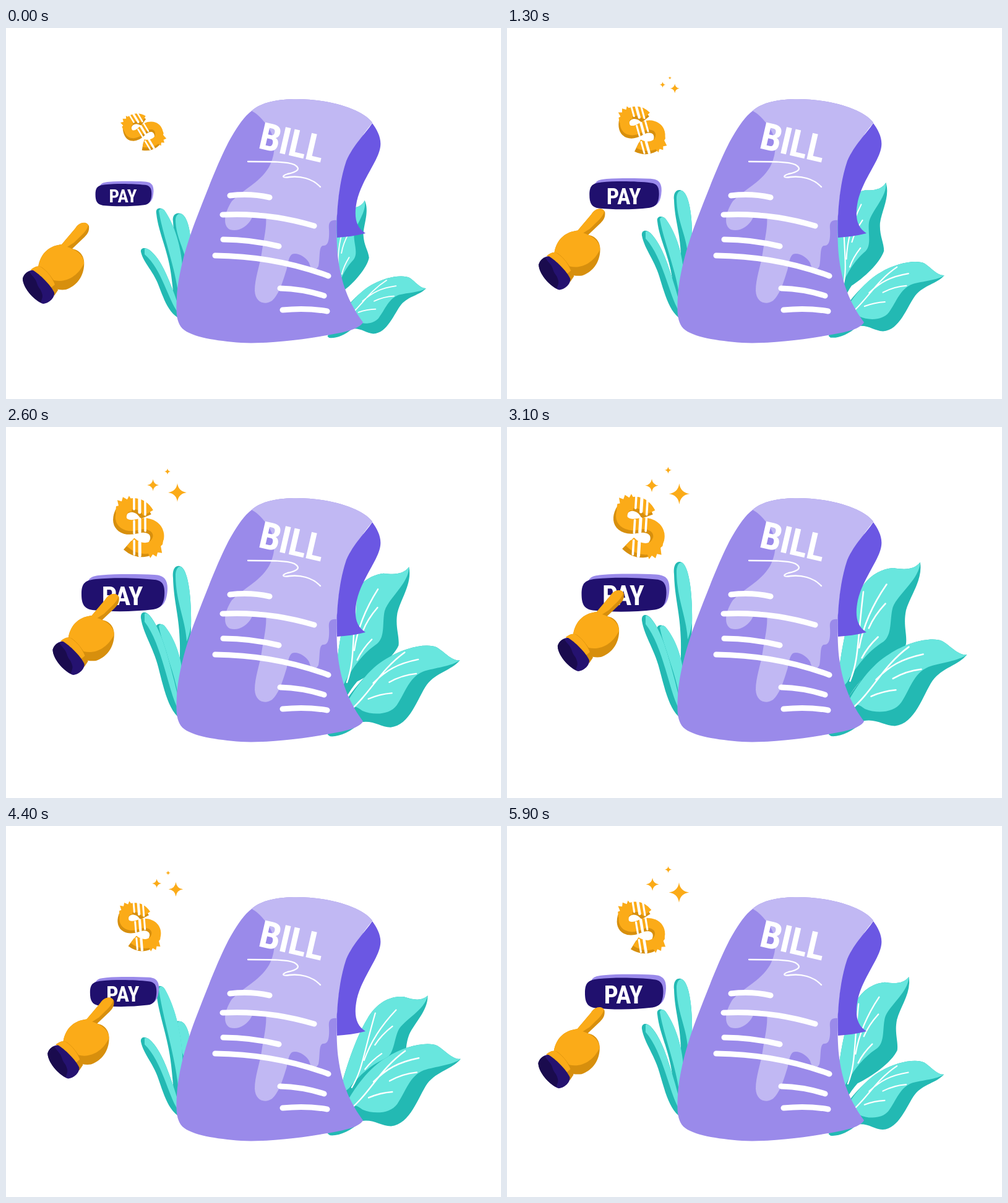
Recreate the animation shown at these times as an HTML page. Size 800 px wide and 600 px high, loop 6 s.

```html
<!DOCTYPE html>
<html lang="en">
<head>
<meta charset="utf-8">
<title>Pay the bill</title>
<style>
html, body { margin: 0; width: 100%; height: 100%; overflow: hidden; background: #fff; }
svg { display: block; width: 100vw; height: 100vh; }
text { font: 700 43px "Roboto Condensed", "Open Sans Condensed", Roboto, "Open Sans", sans-serif; font-stretch: 75%; fill: #fff; }
.light { fill: #68e6de; }
.dark { fill: #23b9b3; }
.gold { fill: #fbab18; }
.amber { fill: #d78f0d; }
.line { fill: none; stroke: #fff; stroke-linecap: round; stroke-linejoin: round; }
</style>
</head>
<body>
<svg viewBox="0 0 800 600">
  <g id="bladeA">
    <path class="dark" d="M270 265C268 250 276 244 284 249C296 258 300 300 299 340C296 400 285 440 278 470C276 440 282 400 281 360C280 320 271 300 270 265Z"/>
    <path class="light" d="M274 260C275 249 281 246 285 250C296 260 300 300 299 335C297 345 295 352 292 358C290 325 274 300 274 260Z"/>
  </g>
  <g id="bladeB">
    <path class="dark" d="M243 300C241 291 250 289 256 295C270 315 284 350 286 400C286 430 281 450 279 470C272 455 271 430 267 400C262 360 246 330 243 300Z"/>
    <path class="light" d="M247 296C249 290 254 292 257 296C271 317 285 352 286 402C286 425 283 440 280 450C279 400 254 340 247 296Z"/>
  </g>
  <g id="bladeC">
    <path class="dark" d="M218 362C217 355 225 354 232 359C252 375 262 405 272 430L279 450L277 468C262 458 255 438 248 420C240 395 222 380 218 362Z"/>
    <path class="light" d="M224 357C228 356 231 358 234 361C252 376 262 405 272 430L279 450L278 460C262 440 252 390 224 366Z"/>
  </g>

  <g id="upperLeaf">
    <path class="dark" d="M530 470C535 400 550 320 570 275C585 240 610 225 635 224C655 228 670 228 680 216C684 245 662 270 654 295C648 320 655 335 652 352C640 375 600 400 575 410C560 425 545 450 530 470Z"/>
    <path class="light" d="M535 430C538 390 550 320 570 275C585 240 610 225 635 224C655 228 670 228 680 216C678 245 640 268 632 290C626 310 630 335 615 346C595 358 575 375 552 412Z"/>
    <path class="line" stroke-width="2.6" d="M557 410C573 375 571 345 584 262M574 355C582 318 600 282 623 251M591 323Q601 302 620 283M578 372Q588 354 606 338"/>
  </g>
  <g id="lowerLeaf">
    <path class="dark" d="M520 497C540 440 590 380 620 362C650 342 690 332 708 340C722 348 735 364 749 362C735 380 708 384 692 406C676 430 664 478 630 482C612 482 600 470 578 474C560 492 540 501 524 500Z"/>
    <path class="light" d="M545 455C565 415 590 380 620 362C650 342 690 332 708 340C722 348 735 364 749 362C735 373 705 376 685 383C660 394 655 420 640 443C628 460 600 462 580 454C572 449 567 444 560 450Z"/>
    <path class="line" stroke-width="2.6" d="M558 454C592 425 609 382 652 350M598 405C620 382 640 370 676 362M626 403Q648 390 673 387M590 433Q610 424 631 422"/>
  </g>

  <path fill="#9a8aea" d="M397 134C412 120 440 115 470 115C520 115 575 130 592 153C565 185 545 225 538 270C534 300 533 345 537 375C543 420 558 450 577 476C572 485 555 490 540 493C480 505 420 511 380 509C340 506 300 500 285 486C274 474 275 455 276 435C278 400 290 355 305 315C330 250 350 200 365 175C375 158 385 143 397 134Z"/>
  <path fill="#c1b8f3" d="M397 134C412 120 440 115 470 115C520 115 575 130 592 153C565 185 545 225 538 270L534 311C524 310 521 315 522 325C523 345 520 352 513 352C505 352 508 370 505 385C500 395 492 390 490 380C485 370 470 362 462 366C455 372 456 385 452 395C446 415 440 432 430 441C418 449 403 444 402 425C402 405 410 385 413 365C416 345 422 320 420 305C415 295 400 298 397 308C390 322 375 330 362 326C350 320 352 300 365 280C385 260 410 250 425 225C438 200 436 175 420 155C412 145 405 138 397 134Z"/>
  <path fill="#6b57e3" d="M592 154C600 165 607 178 605 192C602 215 575 245 567 280C562 305 565 322 581 332C565 336 550 338 535 339C533 300 538 250 550 215C562 188 580 172 592 154Z"/>
  <text transform="translate(406 194) rotate(13)" style="font-size:61px;letter-spacing:-1px">BILL</text>
  <path class="line" stroke-width="2.3" d="M391 216C430 216 455 216 466 221C478 228 470 233 455 236C445 239 446 243 458 241C475 239 495 243 508 257"/>
  <path class="line" stroke-width="9" d="M362 271Q395 267 426 274M350 302Q425 298 498 320M351 342Q395 342 441 353M338 368Q435 369 521 401M443 421Q480 422 514 433M447 456Q485 452 519 458"/>

  <g id="sparkles" class="gold"></g>

  <g id="dollar">
    <g id="coinShape" fill="none" stroke="#d78f0d" stroke-width="19">
      <path d="M226 145C218 126 196 122 185 139C176 161 193 167 210 163C230 157 246 167 242 184C236 205 212 205 196 191"/>
    </g>
    <path class="gold" d="M177 138L178 128L182 127L180 118L187 120L189 113L196 117L199 111L204 119L203 137Z"/>
    <path class="gold" d="M254 182L253 190L250 193L252 204L245 203L243 210L237 206L233 212L229 203L236 186Z"/>
    <path fill="none" stroke="#fbab18" stroke-width="18" d="M230 139C220 121 198 118 188 136C180 155 195 162 212 158C232 152 249 163 246 180C240 201 216 200 201 186"/>
    <path class="line" stroke-linecap="butt" stroke-width="3.5" d="M207 112V133M225 114V142M207 152V172M225 148V168M207 184V206"/>
    <path class="line" stroke-linecap="butt" stroke-width="5" d="M216 112V138M216 149V170M216 186V208"/>
  </g>

  <g id="button">
    <path fill="#9a8aea" d="M130 262C131 243 138 241 155 239.500C180 237.500 215 238 240 239C255 240 261 246 261 262C260 282 254 292 240 293L150 290Z"/>
    <path fill="#20106e" d="M122 270C122 252 128 248 145 246C175 243 215 244 240 247C253 248 257 256 256 272C255 286 251 293 238 295C205 299 170 299 140 296C126 294 122 286 122 270Z"/>
    <text x="188" y="288" text-anchor="middle">PAY</text>
  </g>

  <g id="hand">
    <path class="amber" d="M52 387C56 362 72 352 90 350L112 324C118 314 130 312 134 320C135 328 132 333 127 338L107 357C122 360 128 372 126 386C124 405 112 418 97 423C90 424 82 423 78 421Z"/>
    <path class="gold" d="M52 387C56 362 72 352 90 350L112 324C118 314 130 312 133 319C131 328 122 335 110 347L99 354C116 359 127 370 126 381C117 400 98 413 77 408Z"/>
    <path class="amber" d="M40 391C46 386 52 384 58 387C70 396 80 410 84 424L78 433C72 415 52 396 40 391Z"/>
    <path class="gold" d="M40 391C46 386 52 384 57 387C67 394 75 404 79 415L73 420C64 407 52 396 40 391Z"/>
    <path fill="#251270" d="M27 405C30 396 38 391 44 392C54 398 72 415 78 428C79 436 70 445 60 446C48 443 27 420 27 405Z"/>
    <path fill="#1a0b4e" d="M27 405C29 398 34 394 38 394C41 401 48 404 50 413C53 422 56 421 58 429C61 436 56 440 57 444C44 439 27 420 27 405Z"/>
  </g>
</svg>
<script>
const LOOP = 6000, STEP = 100;
const el = id => document.getElementById(id);
const place = (id, transform) => el(id).setAttribute('transform', transform);

// Piecewise linear value from [time, value] keys.
function track(t, ...keys) {
  const i = keys.findIndex(k => k[0] > t);
  const [t0, a] = keys[i - 1], [t1, b] = keys[i];
  return a + (b - a) * (t - t0) / (t1 - t0);
}

// Scales and turns a group about a pivot, then moves it.
function pose(id, x, y, scale, turn = 0, dx = 0, dy = 0) {
  place(id, `translate(${x + dx} ${y + dy}) rotate(${turn}) scale(${scale}) translate(${-x} ${-y})`);
}

// Stretches a blade upward from its root so that its tip reaches the given height.
function grow(id, restTip, tip) {
  const root = 468;
  place(id, `translate(0 ${root}) scale(1 ${(root - tip) / (root - restTip)}) translate(0 ${-root})`);
}

function star(x, y, r) {
  const k = r * 0.12;
  return `<path d="M${x} ${y - r}Q${x + k} ${y - k} ${x + r} ${y}Q${x + k} ${y + k} ${x} ${y + r}` +
    `Q${x - k} ${y + k} ${x - r} ${y}Q${x - k} ${y - k} ${x} ${y - r}Z"/>`;
}
el('sparkles').innerHTML = star(277, 106, 15) + star(237.5, 94, 9.5) + star(261, 72, 5);

function draw(t) {
  const reach = track(t, [0, 0], [3000, 1], [8000, 0]);
  place('hand', `translate(${56 * reach} ${-52 * reach})`);

  pose('button', 191.5, 268, track(t, [0, .676], [3000, 1.05], [4000, .763], [6000, .952]));
  pose('sparkles', 265.5, 89.4, track(t, [0, 0], [3000, 1.15], [4500, .755], [6000, 1.11]));

  const turn = track(t, [0, -31], [3000, 4.5], [3600, -2], [4500, -5], [6000, -9.7]);
  pose('dollar', 214.5, 161.5, track(t, [0, .7], [3000, 1.045], [4200, .82], [6000, .905]),
    turn, -.22 * turn, -.17 * turn);

  grow('bladeA', 248, track(t, [0, 300], [3000, 214], [3600, 243], [4500, 325], [6000, 242]));
  grow('bladeB', 292, track(t, [0, 292], [3000, 323], [3600, 310], [4500, 253], [6000, 300]));
  grow('bladeC', 357, track(t, [0, 357], [3000, 293], [3500, 356], [6000, 320]));

  pose('upperLeaf', 530, 470, track(t, [0, .67], [3500, 1.01], [4500, .82], [6000, .87]),
    track(t, [0, -16], [3500, 0], [4500, 8], [6000, -3.5]));
  pose('lowerLeaf', 518, 502, track(t, [0, .667], [3500, 1.01], [6000, .78]),
    track(t, [0, 4.5], [3500, 0], [6000, 3.3]));
}

const start = performance.now();
function tick() {
  const t = (performance.now() - start) % LOOP;
  draw(Math.floor(t / STEP) * STEP);
  requestAnimationFrame(tick);
}
tick();
</script>
</body>
</html>
```
